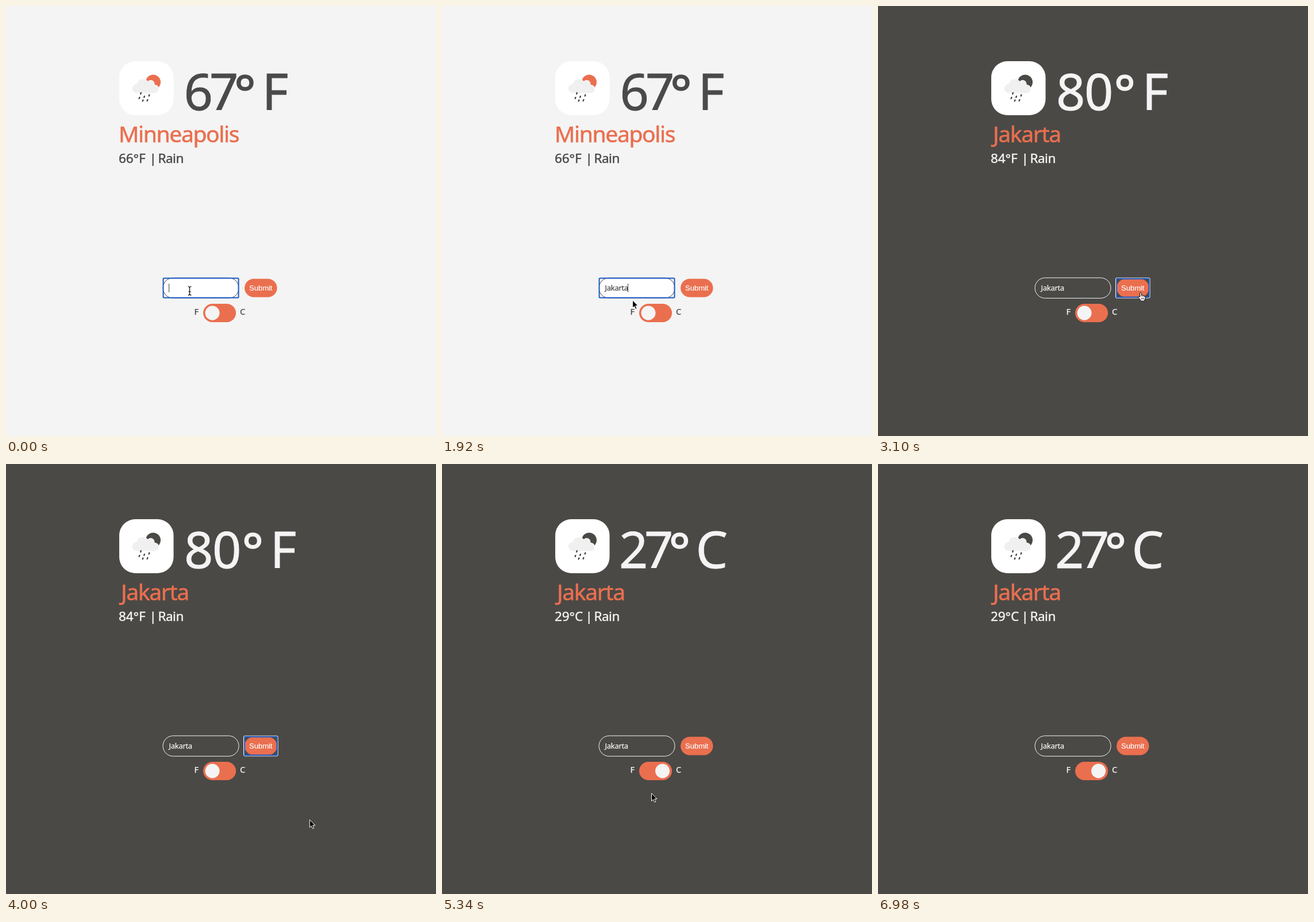
These frames come from a looping animation (748 px wide and 748 px high, 7730 ms). An HTML page:

```html
<!DOCTYPE html>
<html lang="en">
<head>
<meta charset="utf-8">
<title>Weather</title>
<style>
html, body { margin: 0; width: 100%; height: 100%; overflow: hidden; }
svg { display: block; width: 100vw; height: 100vh; background: var(--bg); }
svg { --bg: #f4f4f4; --ink: #4a4a4a; --field: #fff; --sun: #ea6f4f; --ring: #f4f4f4; }
svg.dark { --bg: #4a4946; --ink: #f4f4f4; --field: #4a4946; --sun: #4a4946; --ring: #fff; }
text { font-family: "Noto Sans", "Open Sans", sans-serif; fill: var(--ink); stroke: var(--ink); stroke-width: .25px; white-space: pre; }
.big { font-size: 88px; stroke-width: .9px; }
#deg { stroke-width: 1.6px; }
#city { font-size: 39px; letter-spacing: -1.35px; fill: #ea6f4f; stroke: #ea6f4f; stroke-width: .6px; }
.feel { font-size: 22.5px; letter-spacing: -.1px; stroke-width: .45px; }
#typed { font-size: 13px; letter-spacing: -.3px; }
.unit { font-size: 14.5px; }
#submit { font: 13px "Liberation Sans", Arial, sans-serif; fill: #fff; stroke: #fff; stroke-width: .15px; }
.orange { fill: #ea6f4f; }
.focus { fill: none; stroke: #1d5bc6; stroke-width: 2; }
.halo { fill: none; stroke: var(--ring); stroke-width: 1; }
</style>
</head>
<body>
<svg id="stage" viewBox="0 0 748 748">
  <rect x="197" y="96" width="94.5" height="94" rx="28" fill="#fff"/>
  <circle cx="256" cy="132.5" r="13" fill="var(--sun)"/>
  <path d="M228 151.500A8 8 0 0 1 227.500 135.500A10.500 10.500 0 0 1 246.500 132A6.200 6.200 0 0 1 257.500 137.500A7 7 0 0 1 259.500 151.500Z" fill="#f0f0f0" stroke="#fff" stroke-width="1.200" paint-order="stroke"/>
  <path id="drops" fill="none" stroke="#444" stroke-width="2.300"/>

  <text class="big" id="digits" y="181"></text>
  <text class="big" id="deg" y="184">°</text>
  <text class="big" id="scale" y="181"></text>
  <text id="city" y="237"></text>
  <text class="feel" id="feel" x="196" y="273"></text>
  <text class="feel" x="249.500" y="273">|</text>
  <text class="feel" x="264.500" y="273" style="letter-spacing:-.5px">Rain</text>

  <rect x="273" y="472.800" width="132" height="35.500" rx="17.750" fill="var(--field)" stroke="var(--ink)"/>
  <text id="typed" x="283.500" y="494.500"></text>
  <rect id="caret" y="483" width="1" height="15" fill="#444"/>
  <g id="fieldRing">
    <rect class="halo" x="272" y="472" width="134" height="37" rx="2.500"/>
    <rect class="focus" x="273.500" y="473.500" width="131" height="34" rx="1.500"/>
  </g>

  <rect class="orange" x="415" y="474.500" width="56.500" height="32" rx="16"/>
  <g id="buttonRing">
    <rect class="halo" x="413.500" y="473" width="59.500" height="35" rx="2"/>
    <rect class="focus" x="415" y="474.500" width="56.500" height="32" rx="1"/>
  </g>
  <text id="submit" x="423" y="494.500">Submit</text>

  <text class="unit" x="327.500" y="537">F</text>
  <text class="unit" x="407" y="537">C</text>
  <rect class="orange" x="343" y="518" width="57" height="32" rx="16"/>
  <circle id="knob" cy="534" r="12.500" fill="#f4f4f4"/>

  <g id="beam" fill="none">
    <path d="M-3 -7Q0 -7 0 -5Q0 -7 3 -7M0 -5V6M-3 8Q0 8 0 6Q0 8 3 8M-2 2H2" stroke="#fff" stroke-width="2.500"/>
    <path d="M-3 -7Q0 -7 0 -5Q0 -7 3 -7M0 -5V6M-3 8Q0 8 0 6Q0 8 3 8M-2 2H2" stroke="#000" stroke-width="1.200"/>
  </g>
  <path id="arrow" d="M.5 .8V14.300L3.500 11.500L5.700 16.300L7.900 15.300L5.800 10.600H10Z" fill="#000" stroke="#fff"/>
  <g id="hand">
    <path d="M-1.500 8.500V1.600Q-1.500 .4 -.2 .4T1.100 1.600V5Q3 4.200 3.600 5.600Q5.300 5 5.900 6.400Q8 6 8 8.200V10.500Q7.600 12.500 6.700 13.500V15.200H.3Q-.2 13.500 -2 11.500L-4.300 8.800Q-4.600 7.300 -3.200 7.200Q-2.300 7.400 -1.500 8.500Z" fill="#fff" stroke="#000" stroke-linejoin="round"/>
    <path d="M1.200 9.500V12.500M3.200 9.500V12.500M5.200 9.500V12.500M1.100 5V7.500M3.600 5.600V7.800M5.900 6.400V8.200" fill="none" stroke="#000" stroke-width=".8"/>
  </g>
</svg>
<script>
const LOOP = 7730;
const $ = id => document.getElementById(id);
const stage = $("stage");
const set = (id, name, value) => $(id).setAttribute(name, value);
const show = (id, on) => set(id, "visibility", on ? "visible" : "hidden");
const latest = (list, t) => list.reduce((hit, item) => item[0] <= t ? item : hit);

const drops = [[234.5, 152], [249, 155.5], [240.5, 158], [232, 160], [246, 164], [238, 164.5]];
set("drops", "d", drops.map(([x, y]) => `M${x + .7} ${y - 1.8}L${x - .7} ${y + 1.8}`).join(""));

// time, letters typed, caret x
const typing = [[0, 0, 283], [740, 1, 287], [1030, 2, 293], [1330, 3, 299],
  [1480, 4, 305], [1630, 5, 311], [1920, 7, 323]];

// time, digits, digit x, degree x, scale, scale x, feels-like, city, city x
const views = [
  [0, "67", "309.5 354", 397, "F", 445.5, "66°F", "Minneapolis", 196],
  [3100, "80", "310 359", 410.5, "F", 459.5, "84°F", "Jakarta", 200],
  [5040, "27", "308 352", 394.5, "C", 441.5, "29°C", "Jakarta", 200]
];

// time, pointer, x, y
const moves = [[0, "beam", 319.5, 495], [150, "arrow", 331, 511],
  [2370, "arrow", 345, 508], [2510, "arrow", 382, 500], [2660, "hand", 426, 491],
  [2810, "hand", 447, 488], [2960, "hand", 450, 487.5], [3100, "hand", 457, 498],
  [3250, "arrow", 559, 621]];
for (let i = 1; i <= 8; i++) {
  const p = i / 8, ease = p * p * (3 - 2 * p);
  moves.push([3850 + Math.round((i - 1) * 148.5), i < 8 ? "arrow" : "hand",
    559 - 200 * ease, 621 - 77 * ease * p]);
}
moves.push([5190, "hand", 359, 545], [5340, "arrow", 364, 572], [5490, "arrow", 374, 608],
  [5640, "arrow", 379, 626], [6690, "arrow", 437, 643], [6840, "arrow", 568, 708], [6980, "", 0, 0]);

function render(t) {
  const [, digits, digitX, degX, scale, scaleX, feel, city, cityX] = latest(views, t);
  stage.classList.toggle("dark", t >= 3100);
  $("digits").textContent = digits;
  set("digits", "x", digitX);
  set("deg", "x", degX);
  $("scale").textContent = scale;
  set("scale", "x", scaleX);
  $("feel").textContent = feel;
  $("city").textContent = city;
  set("city", "x", cityX);

  const [, count, caretX] = latest(typing, t);
  const editing = t < 2810;
  $("typed").textContent = "Jakarta".slice(0, count);
  set("caret", "x", caretX);
  show("caret", editing && (t < 440 || t >= 740));
  show("fieldRing", editing);
  show("buttonRing", t >= 2810 && t < 5040);

  const slide = Math.min(1, Math.max(0, Math.floor((t - 4890) / 150) / 3));
  set("knob", "cx", 359 + 24.5 * slide * slide * (3 - 2 * slide));

  const [, kind, x, y] = latest(moves, t);
  for (const id of ["beam", "arrow", "hand"]) {
    show(id, id === kind);
    set(id, "transform", `translate(${x} ${y})`);
  }
}

const start = performance.now();
function tick() {
  render((performance.now() - start) % LOOP);
  requestAnimationFrame(tick);
}
tick();
</script>
</body>
</html>
```
